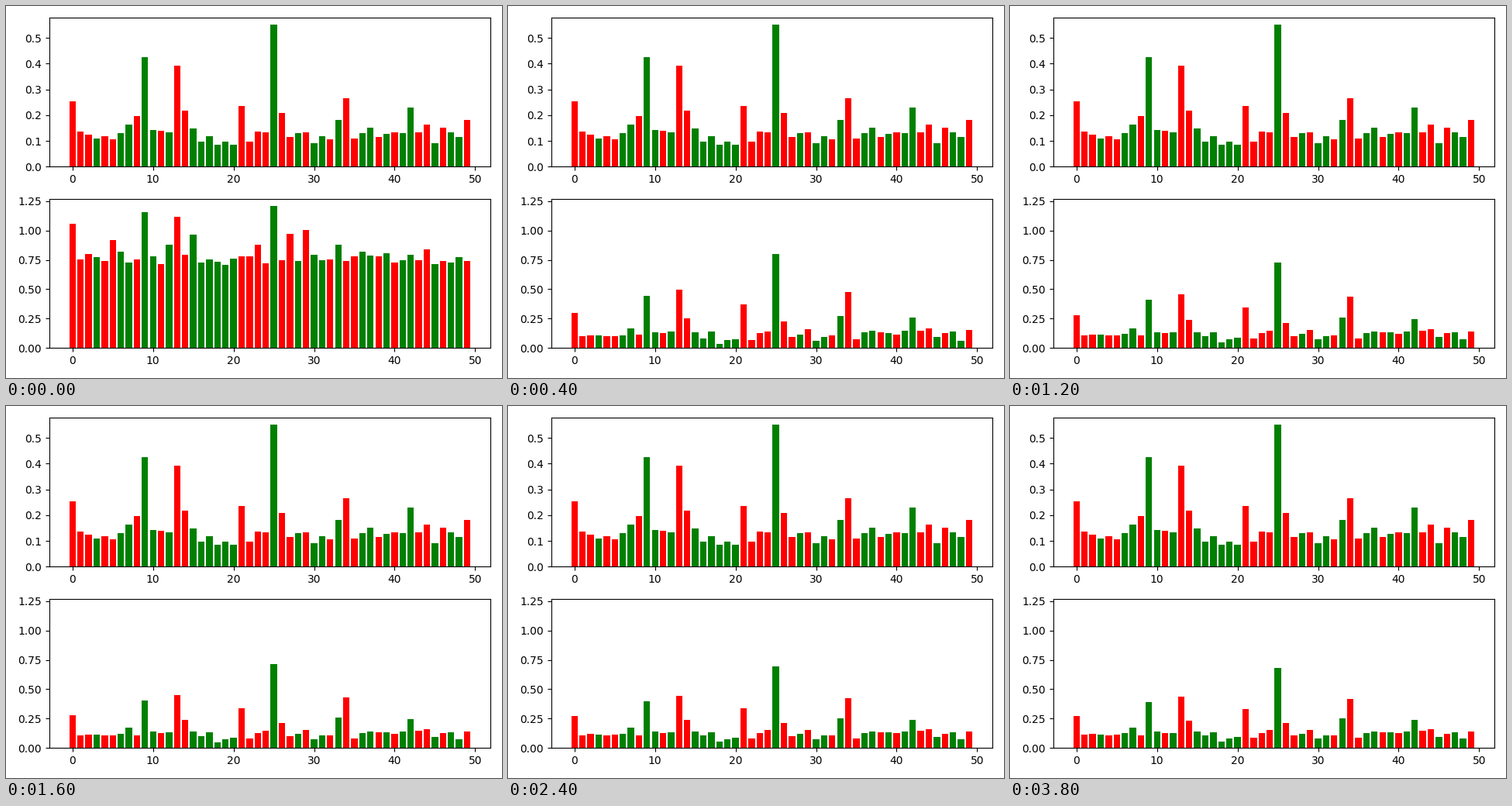
Recreate the animation shown at these times as a matplotlib script. Size 640 by 480 pixels, loop 4000 ms.

```python
import numpy as np
import matplotlib.pyplot as plt
from matplotlib.animation import FuncAnimation

FRAMES = 20
COLORS = list("rrrgrrggrggrgrrggggggrrrrgrrgrggrgrrggrgrggrrgrggr")
N = len(COLORS)

# Tall bars: (reference height, settled height)
PEAKS = {0: (0.253, 0.270), 8: (0.197, 0.105), 9: (0.425, 0.390),
         13: (0.392, 0.435), 14: (0.217, 0.235), 21: (0.235, 0.330),
         25: (0.551, 0.682), 26: (0.209, 0.210), 33: (0.181, 0.250),
         34: (0.265, 0.415), 42: (0.229, 0.240)}
# Bars that stand out at the start
SPIKES = {0: 1.055, 5: 0.920, 9: 1.155, 13: 1.120,
          15: 0.965, 25: 1.208, 27: 0.970, 29: 1.005}

rng = np.random.default_rng(7)
reference = np.clip(rng.normal(0.130, 0.025, N), 0.085, 0.184)
settled = np.clip(reference + rng.normal(-0.005, 0.018, N), 0.04, 0.2)
initial = np.clip(0.71 + rng.exponential(0.06, N), 0.71, 0.88)
for i, (ref, end) in PEAKS.items():
    reference[i], settled[i] = ref, end
for i, start in SPIKES.items():
    initial[i] = start

# The first step overshoots tall bars and undershoots low ones
early = 1.35 * settled - 0.05 + rng.normal(0, 0.015, N) * (settled < 0.2)
early = np.maximum(early, 0)


def estimate(step):
    """Jump to the early guess, then settle with a 1/sqrt(step) slowdown."""
    if step == 0:
        return initial
    last = (FRAMES - 1) ** -0.5
    rest = (step ** -0.5 - last) / (1 - last)
    return settled + (early - settled) * rest


fig, (top, bottom) = plt.subplots(2, 1, figsize=(6.4, 4.8), dpi=100)
x = np.arange(N)
top.bar(x, reference, color=COLORS)
bars = bottom.bar(x, initial, color=COLORS)
fig.tight_layout()
fig.subplots_adjust(left=55.75 / 640)


def update(step):
    for bar, height in zip(bars, estimate(step)):
        bar.set_height(height)
    return list(bars)


anim = FuncAnimation(fig, update, frames=FRAMES, interval=200, repeat=True)
plt.show()
```
